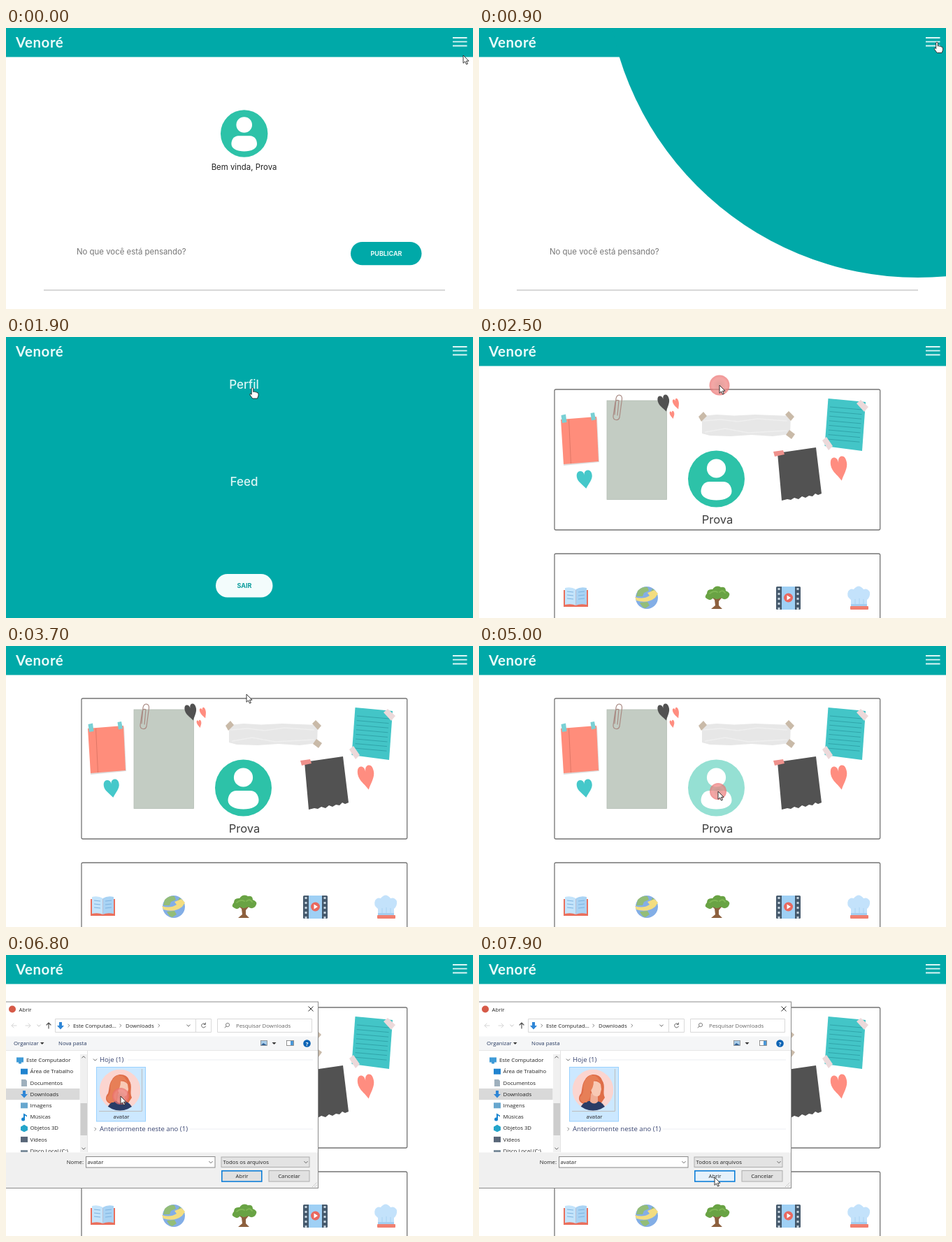
An HTML page that plays this animation: 668 px wide and 402 px high, repeating every 8 s.

```html
<!DOCTYPE html>
<html lang="pt">
<head>
<meta charset="utf-8">
<title>Venoré</title>
<style>
html,body{margin:0;width:100%;height:100%;overflow:hidden;background:#fff}
svg{display:block;width:668px;height:402px}
text{font-family:Inter,sans-serif;white-space:pre}
.ui text{font-family:"Open Sans",sans-serif;font-size:7.8px;fill:#222}
.logo{font:700 20.5px Lato,sans-serif;fill:#e9fbfa;letter-spacing:.5px}
.mid{text-anchor:middle}
.pill{font-size:9px;font-weight:700;text-anchor:middle}
.item{font-size:17px;font-weight:500;text-anchor:middle;fill:#dcf6f5}
.ln{fill:none;stroke-linecap:round;stroke-linejoin:round}
</style>
</head>
<body>
<svg viewBox="0 0 668 402">
<defs>
  <clipPath id="menuClip"><circle id="hole" cx="628" cy="-90" r="0"/></clipPath>
  <clipPath id="sideClip"><rect y="137" width="106" height="145"/></clipPath>
  <clipPath id="faceClip"><circle cx="163" cy="193" r="29.5"/></clipPath>
  <radialGradient id="red"><stop offset="0" stop-color="#d9807c" stop-opacity=".75"/><stop offset=".7" stop-color="#f08a88" stop-opacity=".75"/><stop offset="1" stop-color="#ea6a6a" stop-opacity=".7"/></radialGradient>
  <path id="heart" d="M0 10C-4 5-10 1-10-4C-10-8-8-10-5-10C-2-10 0-8 0-5C0-8 2-10 5-10C8-10 10-8 10-4C10 1 4 5 0 10Z"/>
  <g id="person">
    <circle r="40.5" fill="#2dc2a8"/>
    <circle cy="-15" r="13.6" fill="#fff"/>
    <path d="M-10 4H10C17 4 22 10 22 18C22 26 12 30.500 0 30.500S-22 26-22 18C-22 10-17 4-10 4Z" fill="#fff"/>
  </g>
  <path id="chev" class="ln" d="M-1.200-2L.800 0L-1.200 2" stroke="#666" stroke-width=".8"/>
  <path id="down" class="ln" d="M-2.300-1.100L0 1.200L2.300-1.100" stroke="#555" stroke-width=".9"/>
  <path id="get" d="M-2-5H2V0H5L0 5.500L-5 0H-2Z" fill="#2f86d6"/>
</defs>
<rect width="668" height="402" fill="#fff"/>

<g id="home">
  <use href="#person" transform="translate(340.700 151) scale(.833)"/>
  <text class="mid" x="340.500" y="203" font-size="11.400" fill="#222">Bem vinda, Prova</text>
  <text x="101" y="323.500" font-size="11.400" fill="#777">No que você está pensando?</text>
  <rect x="493" y="306" width="101.500" height="33.300" rx="16.600" fill="#00a9a8"/>
  <text class="pill" x="544" y="326" fill="#e4f8f7">PUBLICAR</text>
  <path d="M54 375H628" stroke="#b0b0b0"/>
</g>

<g id="profile">
  <g fill="none" stroke="#747474" stroke-width="1.300"><rect x="108" y="75" width="465.700" height="201" rx="2"/><rect x="108" y="310" width="465.700" height="120" rx="2"/></g>
  <path d="M119 121L169 116L172 179L121 184Z" fill="#ddd"/>
  <path d="M117 118L168 114L171 178L121 182Z" fill="#ff8d7b"/>
  <path d="M128.500 118L131.500 181" stroke="#dc7464" stroke-width=".9"/>
  <path d="M117.500 112L124 110.500L125.500 122L119 123ZM159.500 109L165 108L167 118L161 119.500Z" fill="#79d0d4"/>
  <rect x="183" y="91" width="85.500" height="141.500" fill="#c3ccc3" stroke="#b4bdb5" stroke-width=".8"/>
  <path class="ln" d="M194 111L196 88Q197 83 201 83Q205 84 204.500 89L201 115Q200 119 196 118.500Q191.500 118 192 113L195 93Q197 89 200 91L198 112" stroke="#a98a83" stroke-width="1.200"/>
  <g id="hearts"></g>
  <path d="M319 113L340 111L365 112.500L395 111L446 113L445 139L420 142L390 140L360 142L330 141L319 138Z" fill="#e7e7e7"/>
  <path class="ln" d="M322 120L345 118L370 121L398 117L440 120M324 136L352 131L385 137L440 134" stroke="#efefef" stroke-width="1.500"/>
  <path d="M314 114L321 107L326 113L318 121ZM438 111L443 106L451 114L446 120ZM444 133L452 139L447 146L439 140Z" fill="#c9baa8"/>
  <use id="avatar" href="#person" transform="translate(339.500 203)"/>
  <text class="mid" x="341" y="267" font-size="16.500" fill="#3e3e3e">Prova</text>
  <path d="M427 166L482 158L490 224L485 226L481 224L477 228L472 227L467 230L462 228L457 232L451 230L446 233L441 232L433 234Z" fill="#525252"/>
  <path d="M421 164L435 162L437 168L423 171Z" fill="#ef918c"/>
  <path d="M499.500 88L553 93L548 163L494.500 156Z" fill="#43c5c7"/>
  <path id="rules" stroke="#2b9ca2" stroke-width=".8"/>
  <path d="M540 95L546 90L557 100L551 107ZM491 148L497 143L506 156L500 162Z" fill="#ecd9da"/>

  <g id="icons">
    <path d="M121 362H156V386H121Z" fill="#ea6f5c"/>
    <path d="M123 359Q132 357 138.500 361V384Q132 381 123 383Z" fill="#c4e4fb"/>
    <path d="M154 359Q145 357 138.500 361V384Q145 381 154 383Z" fill="#a9d3f4"/>
    <path d="M126 364L135 365M126 369L135 370M126 374L135 375M142 365L151 364M142 370L151 369M142 375L151 374" stroke="#7fb4e0"/>
    <circle cx="240" cy="373" r="16" fill="#83aee6"/>
    <path d="M227 363Q233 357 241 358L243 363L236 366L234 371L225 371ZM248 360Q254 364 255 370L249 372L245 366ZM230 380L241 379L244 384L238 388Q233 387 230 380Z" fill="#93bd78"/>
    <path d="M223 372Q235 376 244 370L241 366L251 362L256 367L252 373Q241 382 225 377Z" fill="#f3dd80"/>
    <path d="M337 376L331 371L335 370L340 375L346 370L349 371L343 378V384L348 389H332L338 384Z" fill="#8d603e"/>
    <path d="M327 375Q321 372 326 367Q326 360 334 361Q339 354 346 358Q353 357 353 363Q361 366 357 372Q353 378 346 373Q340 377 335 373Q332 378 327 375Z" fill="#69a344"/>
    <path d="M330 367Q336 362 341 365M344 365Q349 361 352 366" class="ln" stroke="#80b856" stroke-width="1.800"/>
    <rect x="425" y="357" width="35" height="33" rx="1.500" fill="#45596c"/>
    <rect x="433" y="357" width="19" height="33" fill="#9fd0f5"/>
    <path d="M429 359V390M456 359V390" stroke="#c5d3de" stroke-width="3" stroke-dasharray="3 4"/>
    <circle cx="442.500" cy="373" r="6.500" fill="#e9685f"/><path d="M440.500 369.500L446 373L440.500 376.500Z" fill="#fff"/>
    <path d="M532 383V376Q525 371 528 364Q531 359 536 361Q543 352 550 361Q556 359 559 365Q560 372 555 376V383Z" fill="#c3e2fb"/>
    <path d="M538 382V375M544 382V374M550 382V375" stroke="#a9d3f2"/>
    <rect x="532" y="382" width="23" height="3" fill="#a3cdf0"/><rect x="531" y="385" width="26" height="5" rx="1" fill="#f08070"/>
  </g>
</g>

<rect width="668" height="41.500" fill="#00a9a8"/>
<g clip-path="url(#menuClip)" id="menu">
  <rect width="668" height="402" fill="#00a9a8"/>
  <g id="links">
    <text class="item" x="340.500" y="74.300">Perfil</text>
    <text class="item" x="340.500" y="213">Feed</text>
    <rect x="300" y="339" width="81.500" height="33.500" rx="16.700" fill="#f3fcfc"/>
    <text class="pill" x="341" y="359" fill="#0b9c9c">SAIR</text>
  </g>
</g>
<text class="logo" x="14" y="27.500">Venoré</text>
<path d="M639 14H659.500M639 19.700H659.500M639 25.500H659.500" stroke="#dcf6f5" stroke-width="1.800"/>

<g id="dialog" class="ui">
  <rect x="-3" y="67" width="449.500" height="266.500" fill="#fff" stroke="#8c8c8c"/>
  <circle cx="9" cy="77.500" r="5" fill="#d65a48"/>
  <text x="18.500" y="80.500">Abrir</text>
  <path d="M432.500 73.500L439.500 80.500M439.500 73.500L432.500 80.500" stroke="#333"/>
  <path class="ln" d="M15 101H8M11 98L8 101L11 104M28 101H35M32 98L35 101L32 104" stroke="#d6d6d6"/>
  <path class="ln" d="M61 105V97M58 100L61 97L64 100" stroke="#555" stroke-width="1.200"/>
  <use href="#down" x="47" y="101" opacity=".4"/>
  <path d="M70.500 91.500H293.500V110.500H70.500ZM271.500 91.500V110.500M302.500 91.500H437.500V110.500H302.500Z" fill="none" stroke="#d9d9d9"/>
  <use href="#get" x="78" y="101"/><use href="#chev" x="90" y="101"/>
  <text id="crumb" x="97" y="104"></text>
  <g id="tail"><use href="#chev" x="168" y="101"/><text x="175" y="104">Downloads</text><use href="#chev" x="223" y="101"/></g>
  <use href="#down" x="261" y="101"/>
  <path class="ln" d="M285 99A3 3 0 1 0 285.500 102M285.300 97V99.300H283" stroke="#555" stroke-width=".9"/>
  <path class="ln" d="M313 104L315 102" stroke="#777"/><circle cx="317" cy="100" r="2.600" fill="none" stroke="#777" stroke-width=".9"/>
  <text x="329" y="104" style="fill:#666">Pesquisar Downloads</text>

  <path d="M0 116.500H446V136.500H0Z" fill="#f5f6f7"/><path d="M0 136.500H446" stroke="#e6e6e6"/>
  <text x="11" y="129" style="fill:#24375f">Organizar</text><path d="M49 125H54.500L51.700 128ZM380.500 125H386.500L383.500 128Z" fill="#333"/>
  <text x="75" y="129" style="fill:#24375f">Nova pasta</text>
  <rect x="364.500" y="122.500" width="9" height="7" fill="#a9cdea" stroke="#888" stroke-width=".8"/><path d="M365 129L368 126L373 129Z" fill="#305f94"/>
  <rect x="401.500" y="122.500" width="10" height="7" fill="#fff" stroke="#777" stroke-width=".8"/><rect x="407" y="123" width="4" height="6" fill="#4a98d8"/>
  <circle cx="430.500" cy="126.500" r="5.300" fill="#0b64b5"/><text class="mid" x="430.500" y="129.500" style="fill:#fff;font-weight:700">?</text>

  <g id="side" clip-path="url(#sideClip)"></g>
  <rect x="106" y="142" width="10.500" height="140" fill="#f0f0f0"/><rect x="106.500" y="212" width="9.500" height="46" fill="#cdcdcd"/>
  <use href="#down" transform="translate(111 146) scale(1 -1)"/><use href="#down" x="111" y="277"/>
  <path d="M116.500 137V282" stroke="#e3e3e3"/>

  <path d="M174 150H439M263 249H439" stroke="#eceef3"/>
  <use href="#down" x="127.500" y="150"/><use href="#chev" x="128" y="249"/>
  <text x="134" y="153" style="font-size:9.600px;fill:#3a4672">Hoje (1)</text>
  <text x="134" y="252" style="font-size:9.600px;fill:#3a4672">Anteriormente neste ano (1)</text>
  <rect id="pick" x="129.500" y="160.500" width="70" height="77.500"/>
  <path d="M133 223.500H194.500V163" fill="none" stroke="#bdbdbd"/>
  <g clip-path="url(#faceClip)">
    <circle cx="163" cy="193" r="29.500" fill="#fbd5d0"/>
    <path d="M152 178C157 168 173 169 176 179C182 188 176 196 180 204L174 213H150C142 211 141 203 146 198C148 191 147 185 152 178Z" fill="#df6d48"/>
    <path d="M143 225Q145 211 157 209H169Q180 211 183 225Z" fill="#2a3c66"/>
    <path d="M160 198H170V210Q165 215 159 210Z" fill="#efae97"/>
    <path d="M161 181Q170 179 174 185L175 192L173 200Q170 204 164 201Q158 196 161 181Z" fill="#f8c9b5"/>
    <path d="M174 184Q169 177 164 180Q164 190 159 195Q161 203 154 211Q145 212 144 204Q151 198 149 188Q151 176 160 172Q171 171 174 184Z" fill="#e77f57"/>
  </g>
  <text class="mid" x="165" y="234">avatar</text>

  <path d="M0 282.500H446V333H0Z" fill="#f0f0f0"/>
  <text x="111" y="299" text-anchor="end">Nome:</text>
  <rect id="field" x="114.500" y="288.500" width="184.500" height="15.500" fill="#fff"/>
  <path id="caret" d="M117.500 291V301" stroke="#222" stroke-width=".9"/>
  <text id="name" x="116.500" y="299"></text>
  <use href="#down" x="293" y="296.500"/>
  <rect x="308" y="289" width="126" height="14.500" fill="#e3e3e3" stroke="#adadad"/><text x="310.500" y="299">Todos os arquivos</text><use href="#down" x="429" y="296.500"/>
  <rect id="ok" x="308.800" y="308.800" width="57" height="15.200" stroke="#0078d7" stroke-width="1.500"/><text class="mid" x="337.500" y="319">Abrir</text>
  <rect x="376" y="308.500" width="58" height="15.500" fill="#e1e1e1" stroke="#adadad"/><text class="mid" x="405" y="319">Cancelar</text>
  <path d="M438 332L445 325M441.500 332L445 328.500" stroke="#bbb" stroke-dasharray="1.500 1"/>
</g>

<circle id="press" fill="url(#red)"/>
<path id="arrow" d="M0 0V11.300L2.600 8.900L4.500 13L6.400 12.200L4.500 8.200H8Z" fill="#fff" stroke="#222" stroke-width=".9"/>
<path id="hand" d="M-1.300 1Q0-.800 1.300 1V6Q3 4.800 4 6.300Q5.500 5.600 6.300 7Q8.500 6.700 8.500 9V11.500L7 15.500H.200L-3.500 10.500Q-4.300 8.500-2.600 8.600L-1.300 9.800Z" fill="#fff" stroke="#222" stroke-width=".9"/>
</svg>
<script>
const LOOP = 8000;
const $ = id => document.getElementById(id);
const clamp = v => Math.max(0, Math.min(1, v));
const ramp = (t, a, b) => clamp((t - a) / (b - a));
const ease = k => k * k * (3 - 2 * k);
const show = (id, on) => $(id).setAttribute('display', on ? 'inline' : 'none');
const set = (id, attrs) => { for (const k in attrs) $(id).setAttribute(k, attrs[k]); };

// x, y, width scale, height scale, tilt, colour
const hearts = [
  [151.5, 204, 1.1, 1.28, -8, '#45c8ca'], [265, 95, .82, 1.18, -14, '#515151'],
  [282.5, 96, .42, .78, -20, '#ff8d80'], [276.5, 111.5, .33, .55, -12, '#ff8d80'],
  [515.8, 188.5, 1.16, 1.72, -10, '#ff8d80']
];
$('hearts').innerHTML = hearts.map(([x, y, w, h, a, c]) =>
  `<use href="#heart" fill="${c}" transform="translate(${x} ${y}) rotate(${a}) scale(${w} ${h})"/>`).join('');

let rules = '';
for (let i = 0; i < 8; i++) {
  const y = 100 + i * 6.6;
  rules += `M${502 - i * .4} ${y}L${548 - i * .5} ${y + 4}`;
}
set('rules', { d: rules });

const folders = [
  ['Este Computador', '#3f9bd8', 'M-5-4H5V3H-5ZM-2 3H2V5H-2Z'],
  ['Área de Trabalho', '#1f83cf', 'M-5-4H5V4H-5Z'],
  ['Documentos', '#9fb0bd', 'M-4-5H2L4-3V5H-4Z'],
  ['Downloads', '#2f86d6', 'M-2-5H2V0H5L0 5.5L-5 0H-2Z'],
  ['Imagens', '#68a7ce', 'M-5-4H5V4H-5Z'],
  ['Músicas', '#1683cf', 'M-1-5L4-2V0L1-2V3A2.500 2.500 0 1 1-1 1Z'],
  ['Objetos 3D', '#25a5ca', 'M0-5L5-2V3L0 5.5L-5 3V-2Z'],
  ['Vídeos', '#596779', 'M-5-4H5V4H-5Z'],
  ['Disco Local (C:)', '#7a8c9a', 'M-5-1H5V3H-5Z']
];
$('side').innerHTML = '<rect y="191" width="105.500" height="16.200" fill="#d9d9d9"/>' +
  folders.map(([name, color, d], i) => {
    const x = i ? 26 : 20, y = 150.5 + i * 16.2;
    return `<path d="${d}" fill="${color}" transform="translate(${x} ${y})"/><text x="${i ? 34.5 : 29}" y="${y + 2.6}">${name}</text>`;
  }).join('');

const track = [
  [0, 654, 39], [100, 654, 39], [500, 655, 20], [1200, 655, 20], [1800, 352.5, 72.5],
  [2000, 352.5, 72.5], [2350, 344, 69], [3900, 344, 69], [4600, 342, 208], [5900, 342, 208],
  [6600, 164, 202], [7000, 164, 202], [7600, 354, 310], [7750, 354, 310], [7900, 337, 318]
];
function pointer(t) {
  let i = 1;
  while (i < track.length - 1 && track[i][0] < t) i++;
  const [t0, x0, y0] = track[i - 1], [t1, x1, y1] = track[i];
  const k = ease(ramp(t, t0, t1));
  return [x0 + (x1 - x0) * k, y0 + (y1 - y0) * k];
}

// click time, peak radius
const clicks = [[500, 12], [2400, 14.5], [4950, 12], [6750, 12]];

function draw(t) {
  const [x, y] = pointer(t);
  const home = t < 2400, open = t >= 5400, picked = t >= 6800;
  show('home', home);
  show('profile', !home);
  show('menu', home);
  show('dialog', open);

  set('hole', { r: t < 550 ? 0 : 50 + 396 * ramp(t, 550, 900) + 400 * ramp(t, 900, 1280) });
  set('links', { opacity: ramp(t, 1150, 1550) });

  const over = !home && !open && Math.hypot(x - 339.5, y - 203) < 40.5;
  set('avatar', { opacity: over ? .5 : 1 });

  $('crumb').textContent = picked ? 'Este Computad...' : 'Este Computador';
  set('crumb', { x: picked ? 96 : 97 });
  set('tail', { transform: `translate(${picked ? -4 : 0} 0)` });
  $('name').textContent = picked ? 'avatar' : '';
  set('field', { stroke: picked ? '#8a8a8a' : '#0078d7' });
  show('caret', !picked && (t - 5400) % 1060 < 530);
  const near = x > 129 && x < 200 && y > 160 && y < 238;
  set('pick', picked ? { fill: '#cce8ff', stroke: '#99d1ff' }
    : { fill: open && near ? '#e5f3ff' : 'none', stroke: 'none' });
  const hot = x > 308 && x < 366 && y > 308 && y < 325;
  set('ok', { fill: hot ? '#e5f1fb' : '#e1e1e1' });

  const hit = clicks.find(([at]) => t >= at && t < at + 230);
  show('press', hit);
  if (hit) set('press', { cx: x, cy: y, r: hit[1], opacity: 1 - ramp(t, hit[0] + 130, hit[0] + 230) });

  const link = home && (x > 637 && y < 29 || t > 1150 && x > 318 && x < 364 && y > 58 && y < 80);
  show('hand', link);
  show('arrow', !link);
  set(link ? 'hand' : 'arrow', { transform: `translate(${x} ${y})` });
}

function tick(now) {
  draw(now % LOOP);
  requestAnimationFrame(tick);
}
draw(0);
requestAnimationFrame(tick);
</script>
</body>
</html>
```
